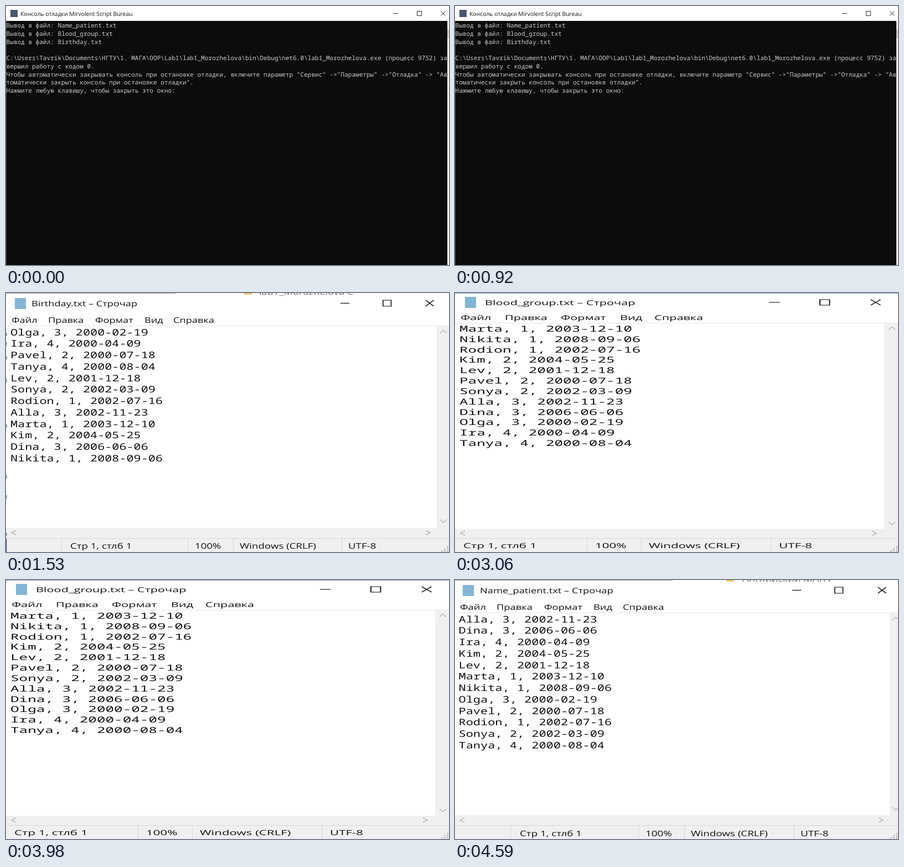
Animation of 800 by 469 pixels, one loop 6120 ms. Source, as an HTML page:

```html
<!DOCTYPE html>
<html lang="ru">
<head>
<meta charset="utf-8">
<title>Консоль и текстовые файлы</title>
<style>
  html, body { margin: 0; width: 100%; height: 100%; overflow: hidden; background: #fff; }
  svg { display: block; width: 100vw; height: 100vh; }
  text { text-rendering: geometricPrecision; white-space: pre; }
  .ui { font-family: "Open Sans", "Noto Sans", sans-serif; }
  .mono { font-family: "Noto Sans Mono", "DejaVu Sans Mono", monospace; }
</style>
</head>
<body>
<svg id="stage" viewBox="0 0 800 469" preserveAspectRatio="none"></svg>
<script>
const HOLD = 1530;
const stage = document.getElementById("stage");

function add(parent, tag, attrs, content) {
  const el = document.createElementNS("http://www.w3.org/2000/svg", tag);
  for (const key in attrs) el.setAttribute(key, attrs[key]);
  if (content !== undefined) el.textContent = content;
  parent.appendChild(el);
  return el;
}

const rect = (g, x, y, width, height, fill) => add(g, "rect", { x, y, width, height, fill });
const path = (g, d, stroke, width, transform = "") =>
  add(g, "path", { d, fill: "none", stroke, "stroke-width": width, transform });

// Text in a window that may be scaled as a whole.
function label(g, text, x, y, size, fill, font, sx = 1, sy = 1) {
  add(g, "text", {
    class: font, "font-size": size, fill,
    transform: `translate(${x} ${y}) scale(${sx} ${sy})`
  }, text);
}

// Minimize, maximize and close; xs holds their left edges.
function buttons(g, xs, y, sx = 1, sy = 1) {
  const shapes = ["M0 0h10", "M.5 -4.5h9v9h-9z", "M.5 -4.5l9 9m0 -9l-9 9"];
  shapes.forEach((d, i) =>
    path(g, d, "#111", 1, `translate(${xs[i]} ${y}) scale(${sx} ${sy})`));
}

function consoleWindow() {
  const g = add(stage, "g", {});
  rect(g, 0, 0, 800, 469, "#fff");
  rect(g, 8, 7, 13, 13, "#4b566c");
  label(g, "Консоль отладки Mirvolent Script Bureau", 26, 17.5, 10.4, "#111", "ui");
  buttons(g, [699, 742, 785], 13.5, 0.9, 0.9);
  rect(g, 0, 27, 800, 442, "#0c0c0c");
  rect(g, 0, 27, 0.8, 442, "#35506f");
  rect(g, 797, 27, 3, 442, "#f0f0f0");
  rect(g, 797, 43, 3, 15, "#cdcdcd");

  const project = "lab1_Morozhelova";
  [
    "Вывод в файл: Name_patient.txt",
    "Вывод в файл: Blood_group.txt",
    "Вывод в файл: Birthday.txt",
    "",
    `C:\\Users\\Tavrik\\Documents\\НГТУ\\1. МАГА\\OOP\\Lab1\\${project}\\bin\\Debug\\net6.0\\${project}.exe (процесс 9752) за`,
    "вершил работу с кодом 0.",
    'Чтобы автоматически закрывать консоль при остановке отладки, включите параметр "Сервис" ->"Параметры" ->"Отладка" -> "Ав',
    'томатически закрыть консоль при остановке отладки".',
    "Нажмите любую клавишу, чтобы закрыть это окно:"
  ].forEach((line, i) => label(g, line, 0.5, 39 + i * 14.78, 11.07, "#ccc", "mono"));
  return g;
}

const people = [
  ["Alla", 3, "2002-11-23"], ["Dina", 3, "2006-06-06"], ["Ira", 4, "2000-04-09"],
  ["Kim", 2, "2004-05-25"], ["Lev", 2, "2001-12-18"], ["Marta", 1, "2003-12-10"],
  ["Nikita", 1, "2008-09-06"], ["Olga", 3, "2000-02-19"], ["Pavel", 2, "2000-07-18"],
  ["Rodion", 1, "2002-07-16"], ["Sonya", 2, "2002-03-09"], ["Tanya", 4, "2000-08-04"]
];
const menu = ["Файл", "Правка", "Формат", "Вид", "Справка"];
const status = ["Стр 1, стлб 1", "100%", "Windows (CRLF)", "UTF-8"];

function editorWindow(o) {
  const g = add(stage, "g", {});
  const { sx, sy } = o;
  const ui = (text, x, y, size = 11.2) => label(g, text, x, y, size, "#111", "ui", sx, sy);

  rect(g, 0, 0, 800, 469, "#fff");
  rect(g, 0, 0, o.edgeW, 1.3, o.edge);
  if (o.behind) {
    rect(g, o.behind.icon, 0, 14, 2.5, "#efb95c");
    label(g, o.behind.text, o.behind.x, 2.5, 11.2, "#666", "ui", sx, sy);
  }
  rect(g, o.iconX, o.titleY - 15, 20, 20, "#83b4d4");
  ui(o.file + " – Строчар", o.titleX, o.titleY);
  buttons(g, o.buttons, o.buttonY, sx, sy);
  menu.forEach((item, i) => ui(item, o.menuX[i], o.menuY));

  rect(g, 0, o.top, 800, 1, "#e6e6e6");
  rect(g, o.barX, o.top + 1, 800 - o.barX, 469 - o.top, "#f0f0f0");
  rect(g, 0, o.barY, 800, 469 - o.barY, "#f0f0f0");
  rect(g, 0, 444, 800, 1, "#d6d6d6");
  o.dividers.forEach(x => rect(g, x, 445, 1, 24, "#d6d6d6"));

  const [cx, up, down, left, right, cy] = o.arrows;
  path(g, `M${cx - 6} ${up + 2.5}l6 -5l6 5M${cx - 6} ${down - 2.5}l6 5l6 -5` +
          `M${left + 4} ${cy - 4}l-8 4l8 4M${right - 4} ${cy - 4}l8 4l-8 4`, "#b9b9b9", 1.6);
  for (let row = 0; row < 3; row++)
    for (let col = 2 - row; col < 3; col++)
      rect(g, 786 + col * 5, 458 + row * 4, 3, 2.5, "#bdbdbd");

  status.forEach((item, i) => ui(item, o.statusX[i], o.statusY, 11.5));
  [...people].sort(o.order).forEach((person, i) =>
    label(g, person.join(", "), o.textX, o.textY + i * o.pitch, 13.43, "#111", "mono", sx, sy));
  (o.specks || []).forEach(y => rect(g, 0, y, 1.5, 6, "#6f87a8"));
  if (o.specks) rect(g, 0, 445, 1.2, 24, "#1e3f78");
  return g;
}

const byDate = (a, b) => a[2].localeCompare(b[2]);
const byGroup = (a, b) => a[1] - b[1];
const byName = (a, b) => a[0].localeCompare(b[0]);

const scenes = [
  consoleWindow(),
  editorWindow({
    file: "Birthday.txt", order: byDate, sx: 1.626, sy: 1.22, edge: "#b4b4b4", edgeW: 306,
    behind: { icon: 430, x: 457, text: "lab1_Morozhelova C" },
    iconX: 16, titleX: 46, titleY: 24, buttons: [604, 680, 757], buttonY: 18.5,
    menuX: [10, 76, 161, 250, 302], menuY: 53.5, top: 59, barX: 778, barY: 425,
    dividers: [100, 328, 410, 606], arrows: [790, 70, 413, 14, 762, 434],
    statusX: [116, 341, 422, 618], statusY: 462.8,
    textX: 8, textY: 76.7, pitch: 20.75, specks: [72, 89, 114, 156, 238, 330, 366, 434]
  }),
  editorWindow({
    file: "Blood_group.txt", order: byGroup, sx: 1.936, sy: 1.11, edge: "#a3b3d1", edgeW: 800,
    iconX: 18, titleX: 54, titleY: 22, buttons: [567, 658, 750], buttonY: 17,
    menuX: [10, 90, 191, 298, 360], menuY: 49, top: 54, barX: 775, barY: 427,
    dividers: [238, 336, 570], arrows: [789, 64, 417, 14, 757, 435],
    statusX: [15, 253, 350, 585], statusY: 462,
    textX: 8, textY: 69.8, pitch: 18.85
  }),
  editorWindow({
    file: "Name_patient.txt", order: byName, sx: 1.636, sy: 1.22, edge: "#b4b4b4", edgeW: 393,
    behind: { icon: 490, x: 519, text: "Английский МАГА" },
    iconX: 14, titleX: 45, titleY: 24, buttons: [609, 685, 763], buttonY: 18.5,
    menuX: [9, 75, 161, 250, 303], menuY: 53.5, top: 59, barX: 785, barY: 426,
    dividers: [100, 331, 414, 612], arrows: [796, 70, 414, 13, 769, 435],
    statusX: [117, 344, 426, 624], statusY: 463.5,
    textX: 6.5, textY: 76.7, pitch: 20.75
  })
];

function draw(time) {
  const current = Math.floor(time / HOLD) % scenes.length;
  scenes.forEach((g, i) => g.setAttribute("display", i === current ? "inline" : "none"));
}

const start = performance.now();
function tick() {
  draw(performance.now() - start);
  requestAnimationFrame(tick);
}
tick();
</script>
</body>
</html>
```
